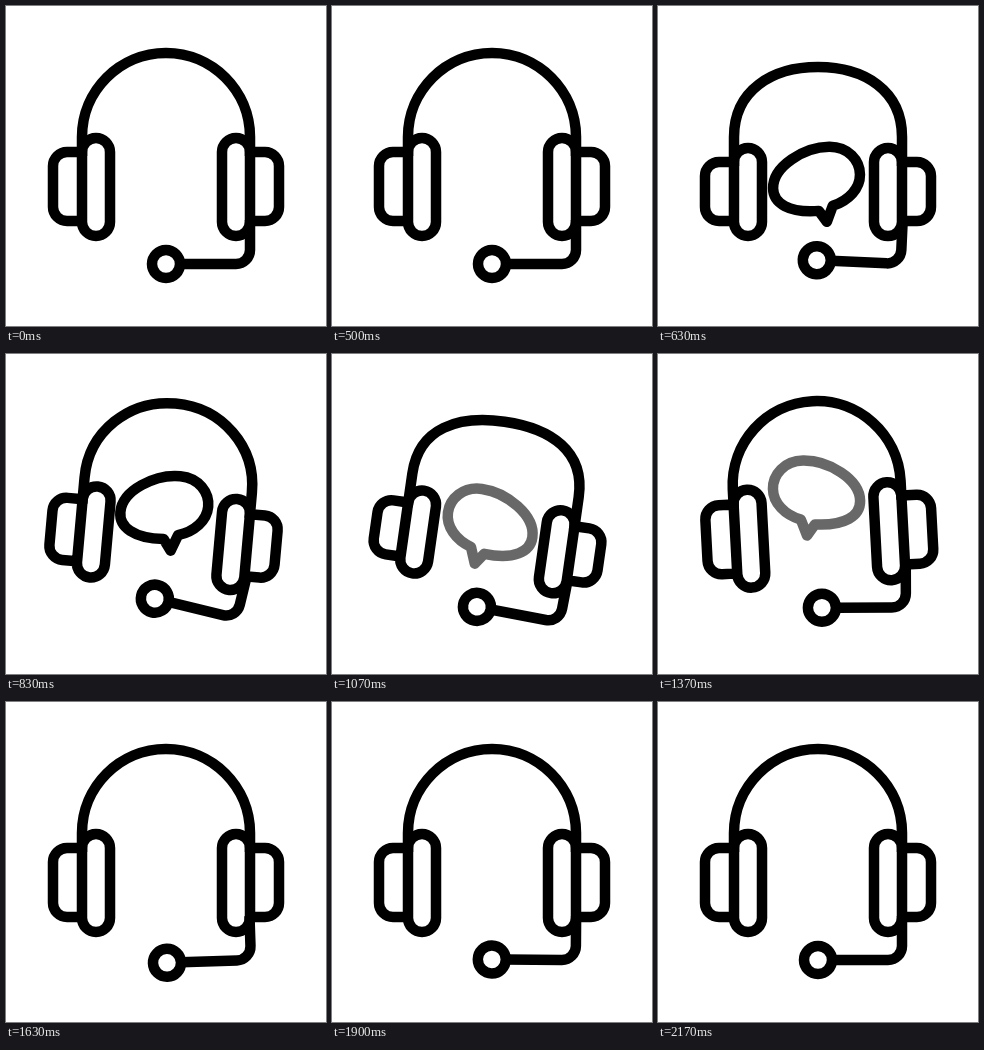
Recreate the animation shown at these times as an HTML page. Size 320 px wide and 320 px high, loop 2.5 s.

```html
<!DOCTYPE html>
<html lang="en">
<head>
<meta charset="utf-8">
<title>Headset</title>
<style>
  html, body { margin: 0; width: 100%; height: 100%; overflow: hidden; background: #fff; }
  svg { display: block; width: 100vw; height: 100vh; }
</style>
</head>
<body>
<svg viewBox="0 0 320 320" fill="none" stroke="#000" stroke-width="10.5" stroke-linejoin="round">
  <defs>
    <path id="bubble" d="M2 32C-28 34 -43.5 24 -43.5 9C-43.5 -13 -12 -32 13 -32C32 -32 43.5 -18 43.5 -4C43.5 10 32 22 16 27L10 43Z"/>
  </defs>
  <g id="head">
    <path id="band"/>
    <path id="cups"/>
    <g id="boom">
      <path d="M244 214V244A14 14 0 0 1 230 258H174"/>
      <circle cx="160" cy="258" r="14"/>
    </g>
  </g>
  <use id="ask" href="#bubble"/>
  <use id="reply" href="#bubble" stroke="#686868"/>
</svg>
<script>
const LOOP = 2500;
const [head, band, cups, boom, ask, reply] =
  ['head', 'band', 'cups', 'boom', 'ask', 'reply'].map(id => document.getElementById(id));

const clamp = u => Math.min(1, Math.max(0, u));
const smooth = u => u * u * (3 - 2 * u);
const ramp = (t, from, to) => smooth(clamp((t - from) / (to - from)));
// Eases from 0 up to 1 at the peak and back to 0.
const swell = (t, from, peak, to) => ramp(t, from, peak) - ramp(t, peak, to);

const tilt = t => 9.1 * swell(t, 620, 1010, 1310) - 3.2 * swell(t, 1250, 1390, 1560);
const bandDip = t => 14.5 * swell(t, 500, 645, 890) + 20 * swell(t, 880, 1060, 1260);
const cupDip = t => 11 * swell(t, 500, 660, 1060) + 14.5 * swell(t, 830, 1060, 1300);
const boomTurn = t => 8.5 * swell(t, 510, 840, 1180) + 3.1 * swell(t, 960, 1340, 1520)
  - 3.2 * swell(t, 1400, 1540, 1750) + 0.8 * swell(t, 1680, 1800, 2000);

const capsule = (x, top) =>
  `M${x} ${top + 14}a14 14 0 0 1 28 0V216a14 14 0 0 1 -28 0Z`;

const shell = (x, dir, top) => {
  const sweep = dir < 0 ? 0 : 1;
  return `M${x} ${top}h${15 * dir}a14 14 0 0 ${sweep} ${14 * dir} 14V201` +
    `a14 14 0 0 ${sweep} ${-14 * dir} 14H${x}`;
};

// Only the crown sinks; the curve handles keep their length.
function bandPath(dip, foot) {
  const crown = 47 + dip;
  return `M76 ${foot}V131C76 84.6 113.6 ${crown} 160 ${crown}S244 84.6 244 131V${foot}`;
}

// Pops up, drifts upward while turning, and shrinks away.
function drawBubble(node, t, { side, start, life, y, turn }) {
  const age = t - start;
  const size = ramp(age, 0, 90) - ramp(age, life - 90, life);
  node.style.display = size > 0.01 ? '' : 'none';
  node.setAttribute('transform', `translate(158.5 ${y - age / 10}) ` +
    `scale(${side * size} ${size}) rotate(${turn + age / 35})`);
}

function draw(t) {
  const dip = cupDip(t);
  head.setAttribute('transform', `rotate(${tilt(t)} 160 156)`);
  band.setAttribute('d', bandPath(bandDip(t), 150 + dip));
  cups.setAttribute('d', capsule(76, 132 + dip) + capsule(216, 132 + dip) +
    shell(76, -1, 146 + dip) + shell(244, 1, 146 + dip));
  boom.setAttribute('transform', `rotate(${boomTurn(t)} 244 230)`);
  drawBubble(ask, t, { side: 1, start: 510, life: 460, y: 185, turn: -4 });
  drawBubble(reply, t, { side: -1, start: 960, life: 540, y: 179.5, turn: -11 });
}

const origin = performance.now();
function tick() {
  draw((performance.now() - origin) % LOOP);
  requestAnimationFrame(tick);
}
tick();
</script>
</body>
</html>
```
